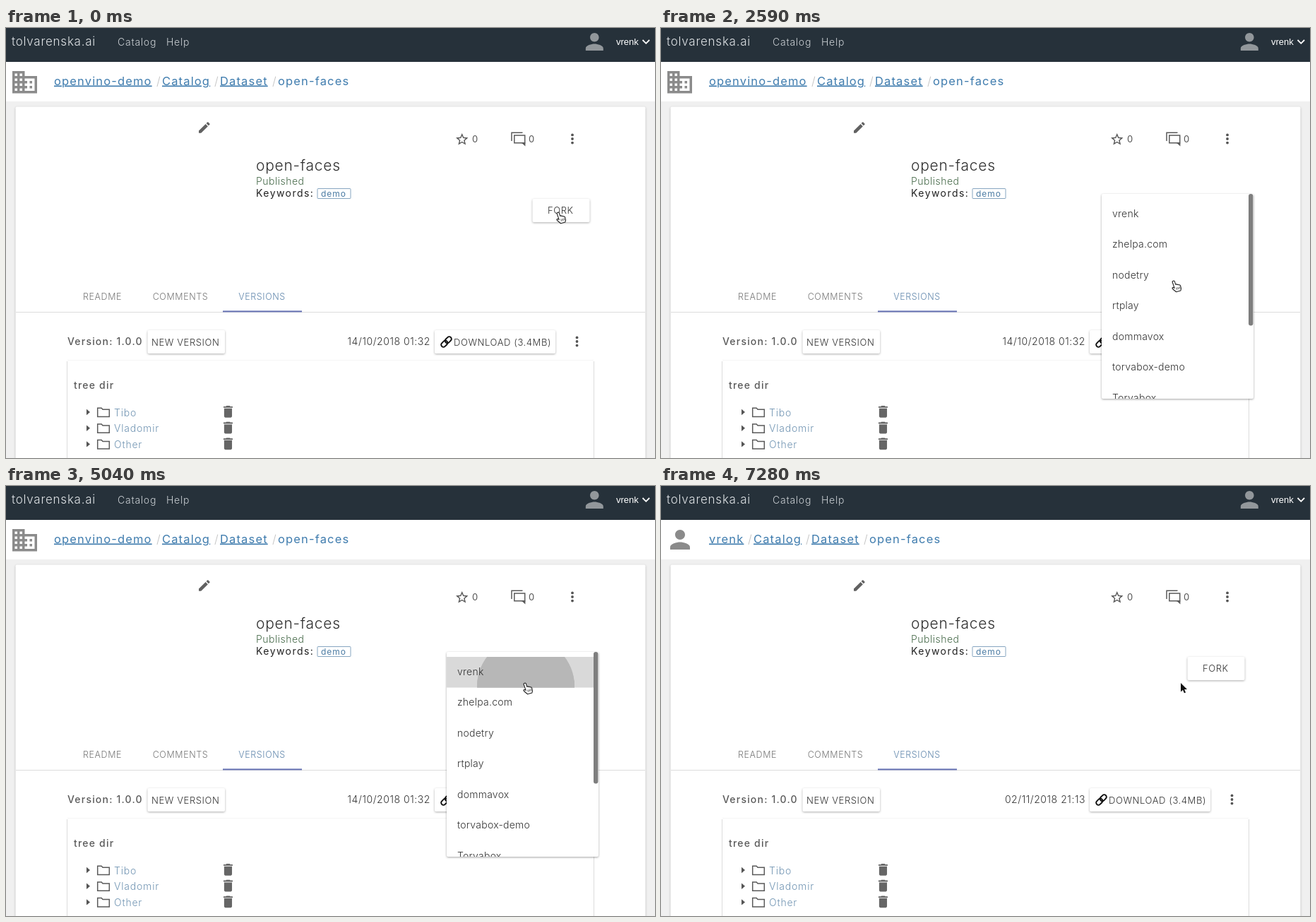
Animation of 919x609 px, one loop 7630 ms. Source, as an HTML page:

```html
<!DOCTYPE html>
<html lang="en">
<head>
<meta charset="utf-8">
<title>Fork a dataset</title>
<style>
html, body { margin: 0; width: 100%; height: 100%; overflow: hidden; background: #f0f0f0; }
svg { display: block; width: 919px; height: 609px; }
text { font: 400 14px Inter, sans-serif; fill: #4a4a4a; white-space: pre; }
.brand { font-size: 17px; font-weight: 300; letter-spacing: .75px; fill: #dde1e4; }
.nav { letter-spacing: .75px; fill: #c9ced2; font-weight: 300; }
.user { font: 13px "Liberation Sans", Arial, sans-serif; fill: #fff; }
.crumbs text { font-size: 16.5px; letter-spacing: 1.15px; fill: #3f7cae; }
.crumbs .link { text-decoration: underline; text-underline-offset: 2px; text-decoration-thickness: 1px; }
.crumbs .slash { fill: #c4c4c4; font-weight: 300; }
.title { font-size: 21px; font-weight: 300; letter-spacing: .75px; fill: #2e2e2e; }
.state { font-weight: 300; letter-spacing: .5px; fill: #486b4b; }
.key { letter-spacing: 1.45px; fill: #222; }
.tag { font-size: 12px; letter-spacing: 1px; fill: #4b7ba3; }
.count { font-size: 13px; fill: #555; }
.tab { font-size: 12.5px; letter-spacing: .6px; text-anchor: middle; fill: #777; font-weight: 300; }
.on { fill: #6288ad; }
.btn { font-size: 13px; letter-spacing: .6px; font-weight: 300; fill: #333; }
.head { letter-spacing: 1.2px; font-weight: 500; fill: #5a5a5a; }
.date { letter-spacing: .55px; text-anchor: end; font-weight: 300; fill: #333; }
.file { letter-spacing: .8px; fill: #7396b4; font-weight: 300; }
.item { letter-spacing: .25px; font-weight: 300; fill: #333; }
.raised { fill: #fff; filter: drop-shadow(0 1.5px 1.5px rgba(0,0,0,.32)); }
.line { fill: none; stroke: #5a5a5a; stroke-width: 1.5; }
#menu { transform-origin: 785px 250px; }
</style>
</head>
<body>
<svg viewBox="0 0 919 609">
  <defs>
    <path id="person" d="M12 12c2.21 0 4-1.79 4-4s-1.79-4-4-4-4 1.79-4 4 1.79 4 4 4zm0 2c-2.67 0-8 1.34-8 4v2h16v-2c0-2.66-5.33-4-8-4z"/>
    <g id="dots" fill="#555"><circle cy="-5.6" r="1.9"/><circle r="1.9"/><circle cy="5.6" r="1.9"/></g>
    <g id="entry">
      <path d="M114 -4.2l5 4.2-5 4.2z" fill="#555"/>
      <path class="line" d="M129.7 -5.8h5.5l1.8 2h9.3v10.4h-16.6z"/>
      <path transform="translate(303.3 -11.8) scale(.93)" fill="#666" d="M6 19c0 1.1.9 2 2 2h8c1.1 0 2-.9 2-2V7H6v12zM19 4h-3.5l-1-1h-5l-1 1H5v2h14V4z"/>
    </g>
    <clipPath id="forkClip"><rect x="745.5" y="242" width="81" height="33" rx="2"/></clipPath>
    <clipPath id="menuClip"><rect x="624" y="235" width="215" height="290" rx="2"/></clipPath>
    <clipPath id="rowClip"><rect x="624" y="242" width="208" height="43.5"/></clipPath>
  </defs>

  <rect width="919" height="609" fill="#f0f0f0"/>
  <rect width="919" height="48" fill="#26313a"/>
  <text class="brand" x="8" y="25">tolvarenska.ai</text>
  <text class="nav" x="158" y="25">Catalog</text>
  <text class="nav" x="227" y="25">Help</text>
  <use href="#person" transform="translate(814.6 .75) scale(1.56)" fill="#92979b"/>
  <text class="user" x="864" y="24">vrenk</text>
  <path d="M901.5 17l4.8 4.8 4.8-4.8" fill="none" stroke="#fff" stroke-width="1.8"/>

  <rect y="48" width="919" height="56" fill="#fff"/>
  <g class="crumbs">
    <g id="orgOwner">
      <path transform="translate(5.5 55.75) scale(1.75)" fill="#8b8b8b" d="M12 7V3H2v18h20V7H12zM6 19H4v-2h2v2zm0-4H4v-2h2v2zm0-4H4V9h2v2zm0-4H4V5h2v2zm4 12H8v-2h2v2zm0-4H8v-2h2v2zm0-4H8V9h2v2zm0-4H8V5h2v2zm10 12h-8v-2h2v-2h-2v-2h2v-2h-2V9h8v10zm-2-8h-2v2h2v-2zm0 4h-2v2h2v-2z"/>
      <text class="link" x="68" y="80.5">openvino-demo</text>
    </g>
    <g id="userOwner" opacity="0">
      <use href="#person" transform="translate(6 55) scale(1.75)" fill="#8b8b8b"/>
      <text class="link" x="68" y="80.5">vrenk</text>
    </g>
    <g id="trail">
      <text class="slash" x="213" y="80.5">/</text>
      <text class="link" x="221" y="80.5">Catalog</text>
      <text class="slash" x="295" y="80.5">/</text>
      <text class="link" x="303" y="80.5">Dataset</text>
      <text class="slash" x="377" y="80.5">/</text>
      <text x="385" y="80.5">open-faces</text>
    </g>
  </g>

  <rect x="13.5" y="111.5" width="892" height="520" rx="2" fill="#fff" style="filter:drop-shadow(0 1px 1.5px rgba(0,0,0,.25))"/>
  <path transform="translate(270.4 130.6) scale(.87)" fill="#616161" d="M3 17.25V21h3.75L17.81 9.94l-3.75-3.75L3 17.25zM20.71 7.04c.39-.39.39-1.02 0-1.41l-2.34-2.34c-.39-.39-1.02-.39-1.41 0l-1.83 1.83 3.75 3.75 1.83-1.83z"/>
  <path transform="translate(635.3 147.3) scale(.87)" fill="#555" d="M22 9.24l-7.19-.62L12 2 9.19 8.63 2 9.24l5.46 4.73L5.82 21 12 17.27 18.18 21l-1.63-7.03L22 9.24zM12 15.4l-3.76 2.27 1-4.28-3.32-2.88 4.38-.38L12 6.1l1.71 4.04 4.38.38-3.32 2.88 1 4.28L12 15.4z"/>
  <text class="count" x="660" y="161.5">0</text>
  <path class="line" d="M716 160V148.2H731.5M719.8 152H734.7V162.8H719.8Z"/>
  <path d="M728 162.5H735.4V167.5L731 163.5z" fill="#5a5a5a"/>
  <text class="count" x="740" y="161.5">0</text>
  <use href="#dots" x="802" y="157"/>

  <text class="title" x="354" y="202">open-faces</text>
  <text class="state" x="354" y="222">Published</text>
  <text class="key" x="354" y="238.5">Keywords:</text>
  <rect x="441" y="227.5" width="47" height="14" rx="1" fill="#fff" stroke="#86a5c0"/>
  <text class="tag" x="446" y="238.5">demo</text>

  <rect class="raised" x="745.5" y="242" width="81" height="33" rx="2"/>
  <g clip-path="url(#forkClip)"><circle id="forkRipple" r="1" opacity="0"/></g>
  <text class="btn" x="767" y="263">FORK</text>

  <text class="tab" x="136.5" y="384.5">README</text>
  <text class="tab" x="247" y="384.5">COMMENTS</text>
  <text class="tab on" x="362.5" y="384.5">VERSIONS</text>
  <path d="M14 402.5H905" stroke="#dcdcdc"/>
  <rect x="307" y="400.4" width="112" height="2" fill="#6672b3"/>

  <text class="head" x="87" y="448.5">Version: 1.0.0</text>
  <rect class="raised" x="200.5" y="428" width="109.5" height="33" rx="2"/>
  <text class="btn" x="206" y="449.5">NEW VERSION</text>
  <text class="date" id="oldDate" x="601" y="449">14/10/2018 01:32</text>
  <text class="date" id="newDate" x="601" y="449" opacity="0">02/11/2018 21:13</text>
  <rect class="raised" x="607" y="428" width="171" height="33" rx="2"/>
  <g transform="translate(623.5 444.5) rotate(-45)" fill="none" stroke="#111" stroke-width="2">
    <rect x="-9" y="-3.2" width="10.2" height="6.4" rx="3.2"/>
    <rect x="-1.2" y="-3.2" width="10.2" height="6.4" rx="3.2"/>
  </g>
  <text class="btn" x="634" y="449.5">DOWNLOAD (3.4MB)</text>
  <use href="#dots" x="808.5" y="444"/>

  <path d="M87 470.5H832" stroke="#f5f5f5"/>
  <path d="M86.5 472V609M832.5 472V609" stroke="#dcdcdc"/>
  <text class="head" x="96" y="510.5">tree dir</text>
  <use href="#entry" y="544"/>
  <use href="#entry" y="566.7"/>
  <use href="#entry" y="589.4"/>
  <text class="file" x="153" y="549.5">Tibo</text>
  <text class="file" x="153" y="572">Vladomir</text>
  <text class="file" x="153" y="594.5">Other</text>

  <g id="menu" opacity="0">
    <rect x="624" y="235" width="215" height="290" rx="2" fill="#fff" style="filter:drop-shadow(0 1.5px 1.8px rgba(0,0,0,.36))"/>
    <g id="items" clip-path="url(#menuClip)">
      <rect id="firstRow" x="624" y="242" width="208" height="43.5" fill="#ededed"/>
      <rect id="fourthRow" x="624" y="372.5" width="208" height="43.5" fill="#ededed" opacity="0"/>
      <g clip-path="url(#rowClip)"><circle id="rowRipple" r="1" opacity="0"/></g>
      <rect x="832" y="235" width="6.4" height="186.5" rx="3" fill="#7e7e7e"/>
    </g>
  </g>

  <g id="hand">
    <path d="M-3.8 -6.7c1.1-.4 2 .1 2.3 1.1l1.2 3.9c1-.8 2-.5 2.4.3.8-.6 1.8-.4 2.2.4 1-.5 1.9 0 2.2 1l.9 3.2c.3 1.6-.3 2.6-.6 3.8l-6.3 1.8c-1.2-1.6-3.3-2.2-5.2-4.6-.8-1.1.4-2.3 1.7-1.5l1.1.7-2.9-8.4c-.3-.9.2-1.5 1-1.7z" fill="#fff" stroke="#222" stroke-width="1.1" stroke-linejoin="round"/>
    <path d="M.8 2.6l.9 3M2.9 2l.9 3M5 1.4l.9 3" stroke="#222" stroke-width=".8"/>
  </g>
  <path id="arrow" opacity="0" transform="translate(736 279)" d="M0 0V12.5L3 9.8 4.9 14.3 7 13.4 5.1 9H9z" fill="#111" stroke="#fff" stroke-width="1" paint-order="stroke"/>
</svg>
<script>
const LOOP = 7630, SWAP = 5880;
const $ = id => document.getElementById(id);

['vrenk', 'zhelpa.com', 'nodetry', 'rtplay', 'dommavox', 'torvabox-demo', 'Torvabox'].forEach((name, i) => {
  const label = document.createElementNS('http://www.w3.org/2000/svg', 'text');
  label.setAttribute('class', 'item');
  label.setAttribute('x', 639);
  label.setAttribute('y', 267.5 + 43.5 * i);
  label.textContent = name;
  $('items').append(label);
});

// keys: [ms, properties]; the last one holds until the loop ends
function play(id, keys, easing = 'linear') {
  const frames = keys.map(([ms, props]) => ({ ...props, offset: ms / LOOP, easing }));
  frames.push({ ...keys[keys.length - 1][1], offset: 1 });
  $(id).animate(frames, { duration: LOOP, iterations: Infinity });
}
const cut = (id, before, after) => play(id, [[0, before], [SWAP, after]], 'steps(1, end)');
const alpha = opacity => ({ opacity });
const move = (x, y) => ({ transform: `translate(${x}px, ${y}px)` });
const pop = (x, y, opacity) => ({ transform: `scale(${x}, ${y})`, opacity });
const tint = (fill, opacity) => ({ fill, opacity });

// keys: [ms, radius, opacity]; invisible until the press
function ripple(id, x, y, keys) {
  const ring = (r, opacity) => ({ transform: `translate(${x}px, ${y}px) scale(${r})`, opacity });
  play(id, [[0, ring(0, 0)], [keys[0][0], ring(0, 0)], ...keys.map(([ms, r, o]) => [ms, ring(r, o)])]);
}

play('hand', [
  [0, move(785, 268)], [2140, move(785, 268)], [2590, move(729, 365)], [2870, move(728, 385)],
  [3130, move(728, 385)], [3430, move(727, 417)], [4030, move(727, 417)], [4480, move(738, 286)]
], 'ease-in-out');

ripple('forkRipple', 785, 261, [[830, 5, .16], [1000, 48, .16], [1110, 48, .16], [1260, 48, 0]]);
ripple('rowRipple', 736, 284, [[4820, 4, .16], [5040, 69, .16], [5320, 130, 0]]);

play('menu', [
  [0, pop(.75, .56, 0)], [1300, pop(.75, .56, 0)], [1540, pop(1, 1, 1)],
  [5100, pop(1, 1, 1)], [5320, pop(.75, .56, 0)]
], 'ease-in-out');

play('firstRow', [
  [0, tint('#ededed', 1)], [2240, tint('#ededed', 1)], [2380, tint('#ededed', 0)],
  [4380, tint('#ededed', 0)], [4480, tint('#ededed', 1)],
  [4820, tint('#ededed', 1)], [5000, tint('#d9d9d9', 1)]
]);
play('fourthRow', [
  [0, alpha(0)], [2680, alpha(0)], [2830, alpha(1)], [4120, alpha(1)], [4270, alpha(0)]
]);

for (const id of ['orgOwner', 'oldDate', 'hand']) cut(id, alpha(1), alpha(0));
for (const id of ['userOwner', 'newDate', 'arrow']) cut(id, alpha(0), alpha(1));
cut('trail', move(0, 0), move(-90, 0));
</script>
</body>
</html>
```
